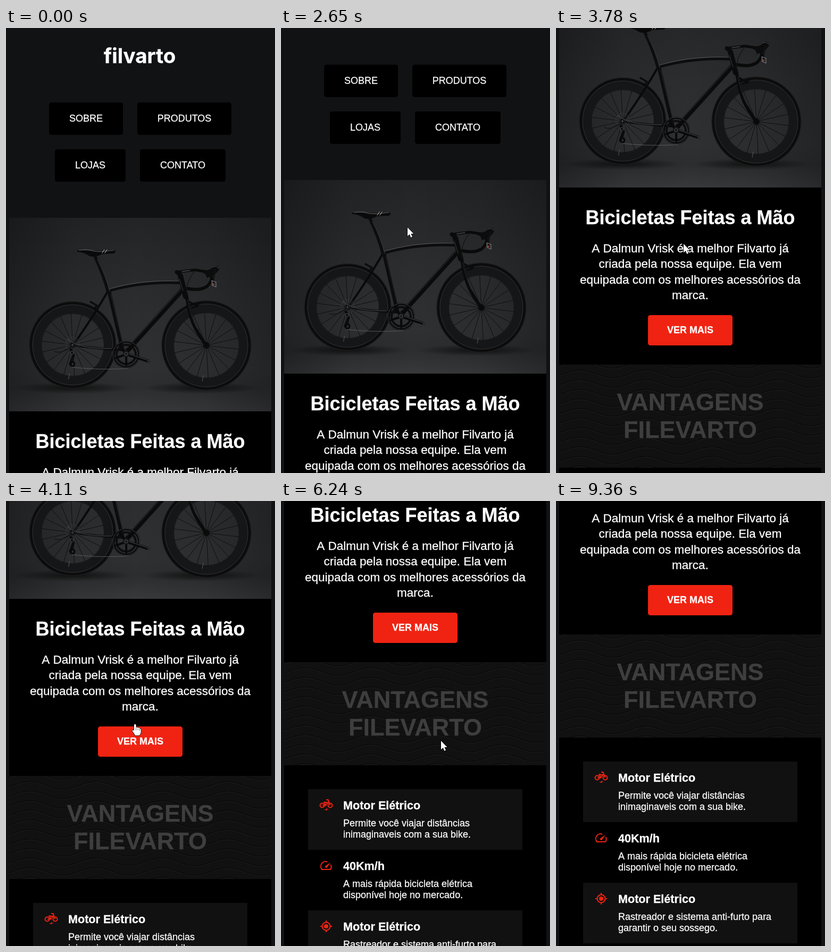
An HTML page with a canvas for the animation above (9500 ms loop, 506 by 837 pixels).

```html
<!DOCTYPE html>
<html lang="pt-BR">
<head>
<meta charset="utf-8">
<title>Bicicletas</title>
<style>
html, body { margin: 0; width: 100%; height: 100%; overflow: hidden; background: #111214; }
canvas { display: block; width: 100vw; height: 100vh; }
</style>
</head>
<body>
<canvas id="stage" width="506" height="837"></canvas>
<script>
const W = 506, H = 837, LOOP = 9500, FADE = 200;
const MID = 252.5;
const RED = '#f02312', DARK_RED = '#c01008';
const SANS = '"Liberation Sans", Arial, sans-serif';
const ctx = document.getElementById('stage').getContext('2d');

// Each row: time, value(s)
const scrollTrack = [[2340, 0], [2800, 105], [3420, 293], [4110, 537], [4300, 600],
  [5490, 600], [6240, 751], [6770, 803]];
const cursorTrack = [[460, 456, 67], [720, 395, 148], [1050, 318, 172], [1410, 228, 184],
  [1730, 157, 194], [1950, 162, 250], [2250, 268, 262], [2480, 238, 372], [3420, 237, 390],
  [4110, 243, 420], [4300, 245, 398], [4440, 246, 396], [4900, 280, 388], [5340, 301, 433],
  [5480, 301, 433], [6240, 301, 451], [6770, 301, 465], [6940, 300, 466], [7300, 294, 540],
  [7790, 286, 650], [8120, 290, 672], [8500, 350, 752], [9050, 440, 838]];

const navItems = [
  { label: 'SOBRE', x: 81, y: 140, w: 139, hover: [1500, 1830] },
  { label: 'PRODUTOS', x: 247, y: 140, w: 177, hover: [710, 1340] },
  { label: 'LOJAS', x: 92, y: 228, w: 133, hover: [1880, 2140] },
  { label: 'CONTATO', x: 252, y: 228, w: 161, hover: [2210, 2330] }
];
const moreHover = [4110, 5470];
const features = [
  { title: 'Motor Elétrico', icon: bikeIcon, hover: [7060, 7560],
    lines: ['Permite você viajar distâncias', 'inimaginaveis com a sua bike.'] },
  { title: '40Km/h', icon: gaugeIcon, hover: [7560, 8330],
    lines: ['A mais rápida bicicleta elétrica', 'disponível hoje no mercado.'] },
  { title: 'Motor Elétrico', icon: targetIcon, hover: [8330, 9130],
    lines: ['Rastreador e sistema anti-furto para', 'garantir o seu sossego.'] }
];

function sample(track, t) {
  const next = track.findIndex(row => row[0] > t);
  if (next === 0) return track[0].slice(1);
  if (next < 0) return track[track.length - 1].slice(1);
  const a = track[next - 1], b = track[next];
  const k = (t - a[0]) / (b[0] - a[0]);
  return a.slice(1).map((v, i) => v + (b[i + 1] - v) * k);
}

const clamp = v => Math.max(0, Math.min(1, v));
const within = ([start, end], t) => t >= start && t < end;
const hoverAmount = ([start, end], t) => clamp((t - start) / FADE) * (1 - clamp((t - end) / FADE));

function rect(x, y, w, h, color, radius = 0) {
  ctx.fillStyle = color;
  ctx.beginPath();
  ctx.roundRect(x, y, w, h, radius);
  ctx.fill();
}

// A hairline outline gives the text its slightly heavy rendering
function text(str, x, y, font, color = '#fff', align = 'center') {
  ctx.font = font;
  ctx.fillStyle = ctx.strokeStyle = color;
  ctx.lineWidth = 0.3;
  ctx.textAlign = align;
  ctx.fillText(str, x, y);
  ctx.strokeText(str, x, y);
}

function stroke(d, color, width) {
  ctx.strokeStyle = color;
  ctx.lineWidth = width;
  ctx.stroke(new Path2D(d));
}

function fill(d, color) {
  ctx.fillStyle = color;
  ctx.fill(new Path2D(d));
}

function ring(x, y, r, color, width) {
  ctx.strokeStyle = color;
  ctx.lineWidth = width;
  ctx.beginPath();
  ctx.arc(x, y, r, 0, Math.PI * 2);
  ctx.stroke();
}

function disc(x, y, r, color) {
  ctx.fillStyle = color;
  ctx.beginPath();
  ctx.arc(x, y, r, 0, Math.PI * 2);
  ctx.fill();
}

function gradient(x0, y0, x1, y1, ...stops) {
  const result = ctx.createLinearGradient(x0, y0, x1, y1);
  stops.forEach(([at, color]) => result.addColorStop(at, color));
  return result;
}

function alphaPart(alpha, draw) {
  if (alpha <= 0) return;
  ctx.save();
  ctx.globalAlpha = alpha;
  draw();
  ctx.restore();
}

function drawHeader(t) {
  text('filvarto', MID - 1, 66, 'bold 38.5px Inter, sans-serif');
  for (const item of navItems) {
    rect(item.x, item.y, item.w, 61, '#000', 4.5);
    alphaPart(hoverAmount(item.hover, t), () => {
      ctx.strokeStyle = '#e32017';
      ctx.lineWidth = 2;
      ctx.beginPath();
      ctx.roundRect(item.x + 1, item.y + 1, item.w - 2, 59, 3.5);
      ctx.stroke();
    });
    text(item.label, item.x + item.w / 2, item.y + 36, '18px ' + SANS);
  }
}

function drawBackdrop() {
  rect(6, 357, 493, 364, gradient(0, 357, 0, 721,
    [0, '#232426'], [0.45, '#2c2d2f'], [0.78, '#2f3032'], [0.88, '#2c2d2e'], [1, '#38393b']));
  rect(6, 357, 493, 364, gradient(6, 0, 499, 0,
    [0, 'rgba(8,8,9,.36)'], [0.25, 'rgba(8,8,9,.08)'], [0.5, 'rgba(8,8,9,0)'],
    [0.75, 'rgba(8,8,9,.08)'], [1, 'rgba(8,8,9,.3)']));
  for (const x of [125, 368]) {
    ctx.save();
    ctx.translate(x, 677);
    ctx.scale(1, 0.1);
    const shadow = ctx.createRadialGradient(0, 0, 0, 0, 0, 110);
    shadow.addColorStop(0, 'rgba(8,8,8,.75)');
    shadow.addColorStop(1, 'rgba(8,8,8,0)');
    disc(0, 0, 110, shadow);
    ctx.restore();
  }
}

function drawWheel(x, y, r) {
  ring(x, y, r - 13, '#151617', 19);
  ring(x, y, r - 3, '#0c0c0d', 6);
  ring(x, y, r - 6.5, '#38393b', 0.8);
  ring(x, y, r - 0.5, '#29292b', 0.8);
  ring(x, y, r - 23, '#101112', 1);
  ctx.strokeStyle = '#0f0f10';
  ctx.lineWidth = 1;
  for (let i = 0; i < 18; i++) {
    const a = i * Math.PI / 9 + 0.12;
    ctx.beginPath();
    ctx.moveTo(x, y);
    ctx.lineTo(x + Math.cos(a) * (r - 22), y + Math.sin(a) * (r - 22));
    ctx.stroke();
  }
  stroke(`M${x - 8} ${y + r - 17}L${x - 6} ${y + r - 28}`, '#666', 0.8);
  disc(x, y, 6, '#0b0b0c');
  disc(x, y, 2, '#444547');
}

function drawBike() {
  drawWheel(125.5, 596, 82);
  drawWheel(377, 597, 84.5);
  ctx.lineCap = ctx.lineJoin = 'round';
  // Frame and fork
  stroke('M191 496Q166 540 128 594', '#0a0a0b', 4);
  stroke('M128 597Q180 604 222 606', '#0a0a0b', 4);
  stroke('M194 496L219 604', '#0c0c0d', 7);
  stroke('M197 500L219 590', '#2d2e30', 0.8);
  stroke('M168 431Q184 465 192 496', '#0d0d0e', 6);
  stroke('M333 491L229 606', '#0b0b0c', 9);
  stroke('M193 494Q255 476 328 479', '#0d0d0e', 6);
  stroke('M194 491Q255 473 326 476', '#505153', 1.2);
  stroke('M328 466L338 505', '#0b0b0c', 10);
  stroke('M326 472L333 494', '#3a3b3d', 1);
  stroke('M340 506Q346 546 357 566T377 597', '#0a0a0b', 6);
  stroke('M342 512Q349 548 360 566', '#343537', 0.8);
  stroke('M329 491L228 602', '#3a3b3d', 1);
  stroke('M172 435Q188 466 195 495', '#3b3c3e', 1);
  // Saddle
  fill('M134 418Q143 415 154 418Q180 420 204 417Q208 421 203 424L181 425Q169 432 157 429Q145 421 134 421Z', '#0a0a0b');
  stroke('M137 418Q153 416 163 419T203 418', '#606163', 1.2);
  stroke('M181 423L185 417M186 423L190 417', '#bbb', 1);
  // Cockpit
  stroke('M328 465L321 459', '#0b0b0c', 7);
  stroke('M322 459L355 455L382 459', '#0a0a0b', 5);
  stroke('M372 458Q397 466 378 486Q365 495 341 490', '#0a0a0b', 6);
  stroke('M377 462Q391 468 375 484', '#37383a', 0.8);
  fill('M372 456Q386 456 392 447Q400 445 401 454Q396 461 390 466L378 470Z', '#0c0c0d');
  stroke('M390 449Q396 446 400 452', '#515254', 1);
  stroke('M394 455Q389 470 391 484', '#111112', 3);
  stroke('M387 475L395 478V487L388 484Z', '#77797b', 1.2);
  disc(390, 482, 2, '#8b4034');
  stroke('M331 458L346 456', '#60666c', 1.2);
  stroke('M356 456Q337 478 340 503', '#141415', 1.2);
  // Brakes
  stroke('M159 515L171 522L166 528M345 515L355 521L365 518M350 526L361 523', '#0b0b0c', 3.5);
  // Drivetrain
  ctx.setLineDash([2, 1.5]);
  stroke('M116 585Q134 603 198 603', '#68696b', 1);
  stroke('M124 638Q180 644 231 640', '#68696b', 1);
  ctx.setLineDash([]);
  for (let r = 4; r <= 14; r += 3) ring(125, 594, r, '#3b3c3e', 0.8);
  stroke('M122 605L127 616L121 632', '#0b0b0c', 5);
  ring(125, 632, 4, '#09090a', 3);
  ring(124, 611, 3, '#4b4c4e', 1);
  stroke('M122 600Q102 614 91 608', '#111213', 1.4);
  ring(226, 614, 24, '#0a0a0b', 4);
  ring(226, 614, 18, '#0d0d0e', 4);
  ctx.setLineDash([1, 2]);
  ring(226, 614, 25, '#626365', 1);
  ctx.setLineDash([]);
  for (let i = 0; i < 5; i++) {
    const a = i * Math.PI * 0.4 + 0.3;
    stroke(`M226 614L${226 + Math.cos(a) * 20} ${614 + Math.sin(a) * 20}`, '#09090a', 4);
  }
  stroke('M226 613L269 627', '#09090a', 6);
  stroke('M231 613L267 625', '#4a4b4d', 1);
  disc(226, 613, 6, '#151617');
  ring(226, 613, 3, '#4b4c4e', 1);
  ring(269, 627, 2, '#555658', 1);
  ctx.lineCap = 'butt';
  ctx.lineJoin = 'miter';
}

function drawHero(t) {
  ctx.save();
  ctx.beginPath();
  ctx.rect(6, 357, 493, 364);
  ctx.clip();
  drawBackdrop();
  drawBike();
  ctx.restore();
  rect(6, 721, 493, 333, '#000');
  text('Bicicletas Feitas a Mão', MID, 790, `bold 36px ${SANS}`);
  ['A Dalmun Vrisk é a melhor Filvarto já', 'criada pela nossa equipe. Ela vem',
    'equipada com os melhores acessórios da', 'marca.']
    .forEach((line, i) => text(line, MID, Math.round(843 + i * 29.3), `22.5px ${SANS}`));
  rect(173, 961, 159, 57, RED, 4.5);
  alphaPart(hoverAmount(moreHover, t), () => rect(173, 961, 159, 57, DARK_RED, 4.5));
  text('VER MAIS', MID, 995, `bold 18px ${SANS}`);
}

function drawWaves(offset, color) {
  ctx.strokeStyle = color;
  ctx.lineWidth = 1.2;
  for (let row = -1; row < 12; row++) {
    ctx.beginPath();
    for (let x = 6; x <= 499; x += 4) {
      ctx.lineTo(x, 1054 + row * 18 + offset - 7 * Math.cos((x - 45) * Math.PI / 62));
    }
    ctx.stroke();
  }
}

function drawBanner() {
  ctx.save();
  ctx.beginPath();
  ctx.rect(6, 1054, 493, 194);
  ctx.clip();
  rect(6, 1054, 493, 194, '#111');
  drawWaves(0, '#060606');
  drawWaves(1.2, '#1b1b1b');
  ctx.restore();
  text('VANTAGENS', MID, 1140, `bold 45px ${SANS}`, '#3e3e3e');
  text('FILEVARTO', MID, 1192, `bold 45px ${SANS}`, '#3e3e3e');
}

// Icons are drawn around their own centre
function bikeIcon() {
  ring(-7.5, 0.5, 4, RED, 2);
  ring(7.5, 0.5, 4, RED, 2);
  stroke('M-7 .5H-1L4-6M-3-5H5M-3-5L-1 .5M0-10H3.5L7.5 .5M-5-5.5H-1', RED, 2);
  fill('M-4 8H0V6L5 8.5H1V10.5Z', RED);
}

function gaugeIcon() {
  stroke('M2-7.3A9 9 0 0 0-8 7H8A9 9 0 0 0 8.5-2', RED, 2);
  fill('M8-6L1.6 3.2A2 2 0 0 1-1.6 .4Z', RED);
}

function targetIcon() {
  ring(0, 0, 7.5, RED, 2);
  disc(0, 0, 4, RED);
  stroke('M0-11V-7M0 7V11M-11 0H-7M7 0H11', RED, 2);
}

function drawFeatures(t) {
  rect(6, 1248, 493, 460, '#000');
  features.forEach((item, i) => {
    const y = 1293 + i * 114;
    if (i % 2 === 0) rect(51, y, 403, 114, '#111');
    alphaPart(hoverAmount(item.hover, t), () => rect(51, y, 4, 114, RED));
    ctx.save();
    ctx.translate(85, y + 30);
    item.icon();
    ctx.restore();
    text(item.title, 117, y + 38, `bold 21.6px ${SANS}`, '#fff', 'left');
    item.lines.forEach((line, n) => text(line, 117, y + 70 + n * 21, `18px ${SANS}`, '#fff', 'left'));
  });
}

function drawCursor(t) {
  if (t < 460 || t >= 9050) return;
  const [x, y] = sample(cursorTrack, t);
  const onLink = [...navItems.map(item => item.hover), moreHover].some(span => within(span, t));
  const shape = onLink
    ? 'M-2 12V1.5a1.8 1.8 0 0 1 3.6 0V7a1.8 1.8 0 0 1 3.6 .5a1.7 1.7 0 0 1 3.3 1a1.5 1.5 0 0 1 2.3 1.5V14q0 4-3 7H0Q-1 18-5 13.5a1.6 1.6 0 0 1 2.3-2.2Z'
    : 'M0 0V16.5L3.8 13L6.3 19L9 17.8L6.5 12H11.5Z';
  ctx.save();
  ctx.translate(Math.round(x), Math.round(y));
  stroke(shape, '#000', 1.4);
  fill(shape, '#fff');
  if (onLink) stroke('M1.6 7V11M5.2 8V11M8.5 9V12', '#333', 0.8);
  ctx.restore();
}

function render(now) {
  const t = now % LOOP;
  const scroll = Math.round(sample(scrollTrack, t)[0]);
  rect(0, 0, W, H, '#111214');
  ctx.save();
  ctx.translate(0, -scroll);
  if (scroll < 300) drawHeader(t);
  drawHero(t);
  drawBanner();
  drawFeatures(t);
  ctx.restore();
  drawCursor(t);
}

const start = performance.now();
function tick() {
  render(performance.now() - start);
  requestAnimationFrame(tick);
}
tick();
</script>
</body>
</html>
```
